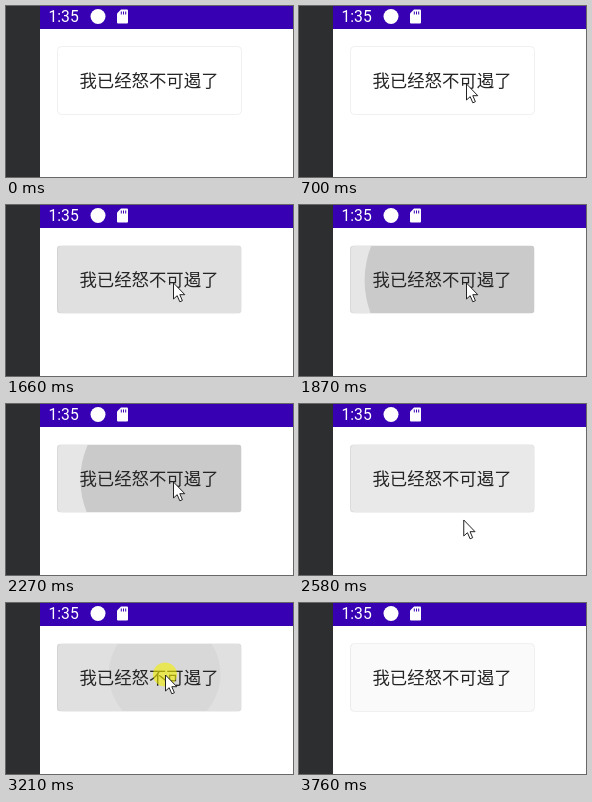
Recreate the animation shown at these times as an HTML page. Size 287 by 171 pixels, loop 4000 ms.

```html
<!DOCTYPE html>
<html lang="zh">
<head>
<meta charset="utf-8">
<title>Button ripple</title>
<style>
  html, body { margin: 0; width: 100%; height: 100%; overflow: hidden; background: #fff; }
  svg { display: block; width: 287px; height: 171px; }
  .clock { font: 15.7px Roboto, sans-serif; fill: #fff; }
  .label { font: 17.4px "Noto Sans CJK SC", "Noto Sans CJK", sans-serif; fill: #252525; }
</style>
</head>
<body>
<svg viewBox="0 0 287 171">
  <clipPath id="card"><rect x="51" y="41" width="184" height="67" rx="2"/></clipPath>
  <rect width="287" height="171" fill="#fff"/>
  <rect width="34" height="171" fill="#2d2e30"/>
  <rect x="34" width="253" height="23" fill="#3700b3"/>
  <text class="clock" x="42.5" y="16">1:35</text>
  <circle cx="92" cy="10.5" r="7.5" fill="#fff"/>
  <path d="M115 3.5H121Q122 3.5 122 4.5V16.5Q122 17.5 121 17.5H112Q111 17.5 111 16.5V7.5Z" fill="#fff"/>
  <path d="M115.3 5.5V8.5M117.5 5.5V8.5M119.7 5.5V8.5" stroke="#3700b3"/>
  <rect x="51.5" y="40.5" width="184" height="68" rx="4" fill="#fff" stroke="#f0f0f0"/>
  <g id="ripples" clip-path="url(#card)"></g>
  <text class="label" x="73.4" y="81.3">我已经怒不可遏了</text>
  <circle id="spot" r="12" fill="#f5f000" fill-opacity=".6"/>
  <path id="cursor" d="M.5 .5V16.5L4.2 13.2L6.8 19.3L9.4 18.2L6.8 12.2H11.8Z" fill="#fff" stroke="#222"/>
</svg>
<script>
const LOOP = 4000, FIRST = 380, STEP = 78.4; // the picture updates every STEP ms from FIRST on
const GROW = 225, FADE = 480, LEAVE = 3740;

// Pointer moves, one after another
const entry = { x: 187, y: 158 };
const moves = [
  { from: FIRST, to: 690, x: 167, y: 77.5 },
  { from: 2400, to: 2680, x: 163, y: 133 },
  { from: 2770, to: 2970, x: 159, y: 71.5 },
  { from: 3370, to: 3700, x: 244, y: 160 }
];
const presses = [
  { down: 1156, up: 1570 }, { down: 1705, up: 1961 }, { down: 2124, up: 2245 },
  { down: 2977, up: 3112 }, { down: 3177, up: 3295 }
];

const byId = id => document.getElementById(id);
const clamp = v => Math.max(0, Math.min(1, v));
const ease = u => u * u * (3 - 2 * u);
const set = (el, attrs) => { for (const k in attrs) el.setAttribute(k, attrs[k]); };
const show = (el, on) => set(el, { visibility: on ? "visible" : "hidden" });

function pointerAt(t) {
  let { x, y } = entry;
  for (const m of moves) {
    const k = ease(clamp((t - m.from) / (m.to - m.from)));
    x += (m.x - x) * k;
    y += (m.y - y) * k;
  }
  return { x, y };
}

for (const p of presses) {
  p.at = pointerAt(p.down);
  p.el = document.createElementNS("http://www.w3.org/2000/svg", "circle");
  byId("ripples").append(p.el);
}

function draw(time) {
  const t = time < FIRST ? 0 : FIRST + Math.floor((time - FIRST) / STEP) * STEP;
  for (const { down, up, at, el } of presses) {
    const grow = clamp((t - down) / GROW);
    const fade = 1 - clamp((t - up) / FADE) ** 3.4;
    set(el, {
      cx: at.x + 1 - 12 * grow, cy: at.y - 3 * grow, r: 49 + 61 * grow,
      "fill-opacity": 0.122 * clamp((t - down) / 90) * fade
    });
  }

  const { x, y } = pointerAt(t);
  set(byId("cursor"), { transform: `translate(${x} ${y})` });
  set(byId("spot"), { cx: x, cy: y });
  show(byId("cursor"), t >= FIRST && t < LEAVE);
  show(byId("spot"), presses.some(p => t >= p.down && t < p.down + 100));
}

const start = performance.now();
function frame() {
  draw((performance.now() - start) % LOOP);
  requestAnimationFrame(frame);
}
frame();
</script>
</body>
</html>
```
